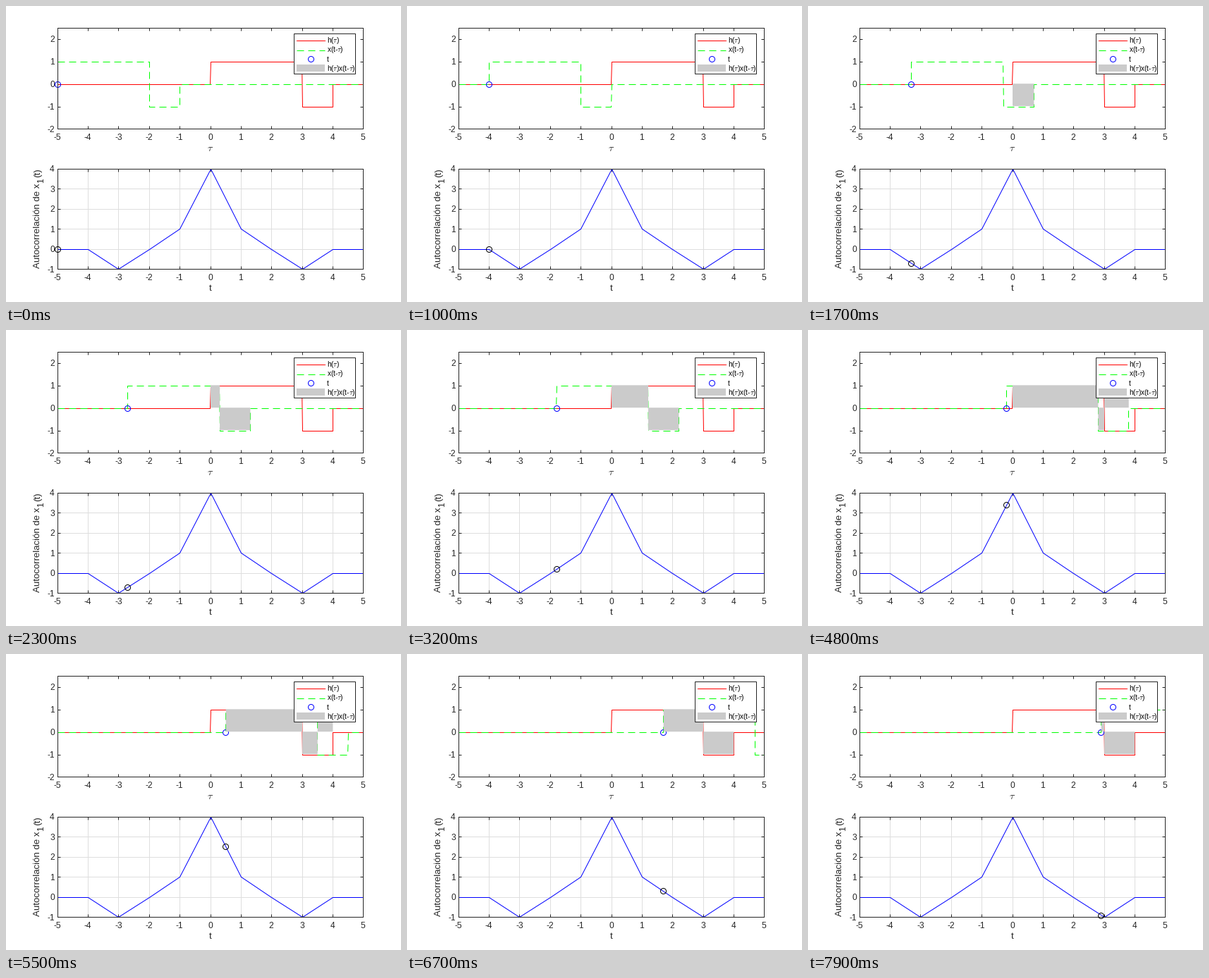
A matplotlib script for the animation above (8 s loop, 560 by 420 pixels).

```python
import numpy as np
import matplotlib.pyplot as plt
from matplotlib.animation import FuncAnimation
from matplotlib.patches import Polygon, Rectangle
from matplotlib.transforms import Affine2D

W, H, DPI = 560, 420, 72  # at 72 dpi one point equals one pixel
FRAMES, INTERVAL = 80, 100
INK, GREY = "#262626", "#cbcbcb"
RED, GREEN, BLUE = "#ff0000", "#00ff00", "#0000ff"
DASH = (0, (10, 6))
STEP = 0.005  # sampling step, gives the pulse edges a slight slope

plt.rcParams.update({
    "font.family": "Liberation Sans",
    "font.size": 12,
    "mathtext.fontset": "cm",
    "axes.unicode_minus": False,
    "axes.linewidth": 1,
    "axes.edgecolor": INK,
    "lines.linewidth": 1,
})

fig = plt.figure(figsize=(W / DPI, H / DPI), dpi=DPI, facecolor="white")


def add_plot(bottom, top, ylim, yticks):
    left, right = 72.8, 506.24
    ax = fig.add_axes([left / W, bottom / H, (right - left) / W, (top - bottom) / H])
    ax.set(xlim=(-5, 5), ylim=ylim, xticks=range(-5, 6), yticks=yticks)
    ax.tick_params(direction="in", top=True, right=True, length=4, width=1,
                   color=INK, labelcolor=INK)
    ax.tick_params(axis="x", pad=6.5)
    ax.tick_params(axis="y", pad=4)
    return ax


def level(tau):
    """Pulse: 1 on [0, 3), -1 on [3, 4), 0 elsewhere."""
    return np.where((tau >= 0) & (tau < 3), 1, np.where((tau >= 3) & (tau < 4), -1, 0))


def pulse(shift):
    edges = [shift, shift + 3, shift + 4]
    xs = [-5] + [max(x, -5) for e in edges for x in (e - STEP, e)] + [10]
    return xs, [0, 0, 1, 1, -1, -1, 0, 0]


def product_outline(t):
    edges = np.unique(np.round(np.clip([-5, 0, 3, 4, t, t + 3, t + 4, 5], -5, 5), 6))
    mid = (edges[:-1] + edges[1:]) / 2
    heights = level(mid) * level(mid - t)
    xs = np.concatenate([[-5], np.repeat(edges, 2)[1:-1], [5]])
    ys = np.concatenate([[0], np.repeat(heights, 2), [0]])
    return np.column_stack([xs, ys])


def ring(ax, color, **kw):
    return ax.plot([], [], "o", ms=8, mfc="none", mec=color, mew=1, **kw)[0]


# Signals
top = add_plot(245.55, 389, (-2, 2.5), range(-2, 3))
top.plot(*pulse(0), color=RED, snap=True)
x_line, = top.plot([], [], color=GREEN, ls=DASH, dash_capstyle="butt", snap=True)
t_mark = ring(top, BLUE, clip_on=False)
area = Polygon([(0, 0), (0, 0)], fc=GREY, lw=0, zorder=2.2, snap=False)
top.add_patch(area)
# Edges run through pixel centres, like the snapped lines
area.set_transform(top.transData + Affine2D().translate(0.5, 0.5))

# Correlation
low = add_plot(46.6, 189.4, (-1, 4), range(-1, 5))
low.set_axisbelow(True)
low.grid(color="#dedede", lw=1)
CORR_T = np.arange(-5, 6)
CORR = [0, 0, -1, 0, 1, 4, 1, 0, -1, 0, 0]
low.plot(CORR_T, CORR, color=BLUE, snap=True)
r_mark = ring(low, "black", clip_on=False, zorder=3)

# Labels and legend in pixel coordinates
over = fig.add_axes([0, 0, 1, 1], zorder=5)
over.set(xlim=(0, W), ylim=(H, 0))
over.axis("off")
over.text(290, 206, r"$\tau$", size=14, color=INK, ha="center")
over.text(290, 404, "t", size=13.3, color=INK, ha="center")

side = dict(size=13.3, color=INK, rotation=90, rotation_mode="anchor",
            ha="left", va="baseline")
part = over.text(48, 371.5, "Autocorrelación de x", **side)
for text, base, size in (("1", 53, 12), ("(t)", 48, 13.3)):
    part = over.annotate(text, xy=(base, 1), xycoords=("figure pixels", part),
                         xytext=(0, 0.5), textcoords="offset pixels",
                         **{**side, "size": size})

over.add_patch(Rectangle((408, 39), 87, 57, fc="white", ec=INK, lw=1))
over.plot([412, 452], [48.8, 48.8], color=RED)
over.plot([412, 452], [62.8, 62.8], color=GREEN, ls=DASH, dash_capstyle="butt")
ring(over, BLUE).set_data([432], [75.4])
over.add_patch(Rectangle((412, 83), 40, 10, fc=GREY, lw=0))
entries = (r"h($\tau$)", r"x(t-$\tau$)", "t", r"h($\tau$)x(t-$\tau$)")
for y, text in zip((52, 65, 79, 92), entries):
    over.text(455, y, text, size=10, color="black")


def update(i):
    t = round(-5 + 0.1 * i, 6)
    x_line.set_data(*pulse(t))
    t_mark.set_data([t], [0])
    r_mark.set_data([t], [np.interp(t, CORR_T, CORR)])
    area.set_xy(product_outline(t))
    return x_line, t_mark, r_mark, area


anim = FuncAnimation(fig, update, frames=FRAMES, interval=INTERVAL,
                     repeat=True, repeat_delay=0, blit=False)
plt.show()
```
